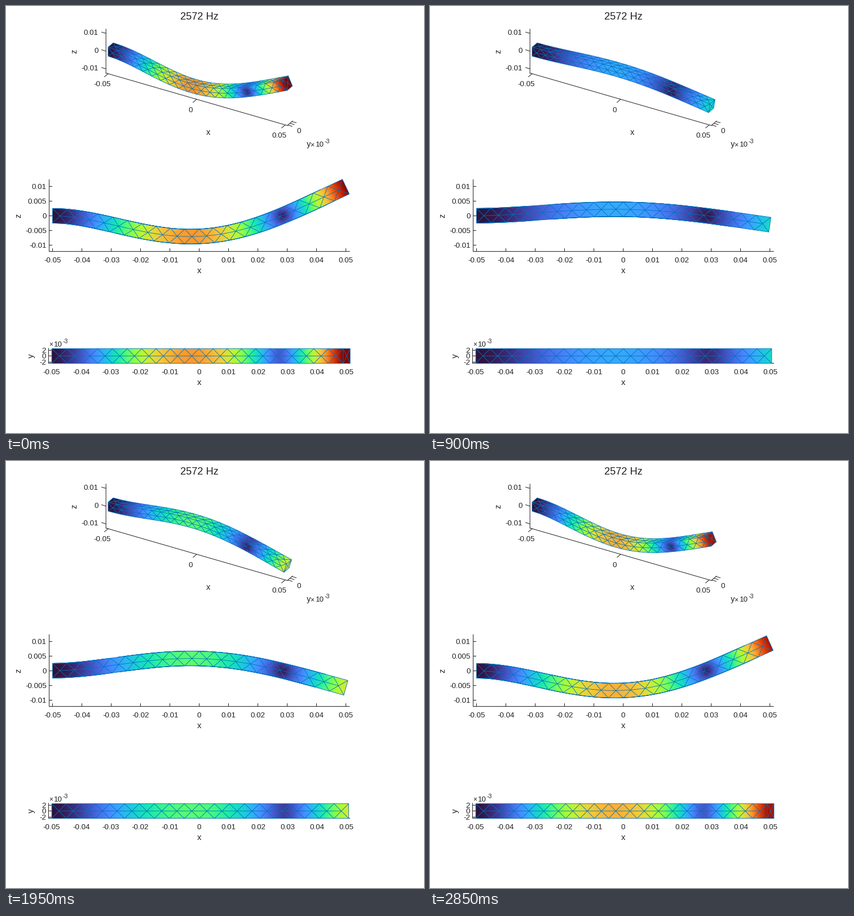
Recreate the animation shown at these times as a matplotlib script. Size 741 px wide and 756 px high, loop 3 s.

```python
import numpy as np
import matplotlib.pyplot as plt
from matplotlib.animation import FuncAnimation
from matplotlib.collections import LineCollection
from matplotlib.path import Path
from matplotlib.tri import Triangulation

W, H, DPI = 741, 756, 100
FRAMES, INTERVAL = 20, 150
PX = 72 / DPI                      # one pixel in points
INK, EDGE = "#212121", "#0072BD"
TICK, LABEL, TITLE, EXPONENT = 13.33, 14.67, 18.3, 10.6
plt.rcParams["font.family"] = "Liberation Sans"

LENGTH, HALF, CELLS = 0.1, 0.0025, 20
TIP = 0.0099                       # tip deflection at full swing
SPLIT = 4                          # colour subdivisions per triangle edge

fig = plt.figure(figsize=(W / DPI, H / DPI), dpi=DPI, facecolor="white")
ax = fig.add_axes([0, 0, 1, 1])
ax.set_xlim(0, W)
ax.set_ylim(H, 0)
ax.set_autoscale_on(False)
ax.axis("off")


# Beam mesh: four long faces plus the free end, wound outwards

def build_mesh():
    step = LENGTH / CELLS
    xs = -LENGTH / 2 + step * np.arange(CELLS + 1)
    ring = [(-1, -1), (-1, 1), (1, 1), (1, -1)]
    nodes, tris = [], []

    def add_row(xvals, y, z):
        start = len(nodes)
        nodes.extend((x, y * HALF, z * HALF) for x in xvals)
        return range(start, len(nodes))

    corners = [add_row(xs, y, z) for y, z in ring]
    end = add_row([xs[-1]], 0, 0)[0]
    for k in range(4):
        (ya, za), (yb, zb) = ring[k], ring[(k + 1) % 4]
        a, b = corners[k], corners[(k + 1) % 4]
        m = add_row(xs[:-1] + step / 2, (ya + yb) / 2, (za + zb) / 2)
        for j in range(CELLS):
            tris += [(a[j], a[j + 1], m[j]), (b[j + 1], b[j], m[j])]
            if j + 1 < CELLS:
                tris += [(a[j + 1], m[j + 1], m[j]), (b[j + 1], m[j], m[j + 1])]
        tris += [(a[0], m[0], b[0]), (a[-1], b[-1], m[-1]), (end, b[-1], a[-1])]
    return np.array(nodes), np.array(tris)


def bending_mode(s):
    """Second cantilever mode and its slope, scaled to 1 at the tip."""
    beta, sigma = 4.69409, 1.018467

    def shape(t):
        t = beta * t
        return np.cosh(t) - np.cos(t) - sigma * (np.sinh(t) - np.sin(t))

    t = beta * s
    slope = beta * (np.sinh(t) + np.sin(t) - sigma * (np.cosh(t) - np.cos(t)))
    return shape(s) / shape(1.0), slope / shape(1.0)


def displacement(pts):
    deflection, slope = bending_mode(pts[..., 0] / LENGTH + 0.5)
    u = np.zeros_like(pts)
    u[..., 0] = -pts[..., 2] * slope * TIP / LENGTH
    u[..., 2] = deflection * TIP
    return u


def subdivision(n):
    """Barycentric weights and small triangles of a split triangle."""
    index, weights, small = {}, [], []
    for i in range(n + 1):
        for j in range(n + 1 - i):
            index[i, j] = len(weights)
            weights.append((1 - (i + j) / n, i / n, j / n))
    for i in range(n):
        for j in range(n - i):
            small.append((index[i, j], index[i + 1, j], index[i, j + 1]))
            if i + j < n - 1:
                small.append((index[i + 1, j], index[i + 1, j + 1], index[i, j + 1]))
    return np.array(weights), np.array(small)


NODES, TRIS = build_mesh()
MODE = displacement(NODES)
WEIGHTS, SMALL = subdivision(SPLIT)
FINE_SIZE = np.linalg.norm(
    displacement(np.einsum("mk,tkd->tmd", WEIGHTS, NODES[TRIS])), axis=2)


# Views: pixel origin and projection matrix

S, C30 = 3626, np.sqrt(3) / 2
ISO = (np.array([342.5, 122.3]),
       S * np.array([[C30, 0.5, 0], [0.25, -C30 / 2, -C30]]))
SIDE = (np.array([342.5, 371.3]), 5200 * np.array([[1, 0, 0], [0, 0, -1]]))
TOP = (np.array([342.5, 619.75]), 5228 * np.array([[1, 0, 0], [0, -1, 0]]))


def project(view, pts):
    origin, matrix = view
    return origin + np.asarray(pts) @ matrix.T


# Static axes

def text(x, y, s, size=TICK, ha="center", rotation=0):
    ax.text(x, y, s, fontsize=size * PX, color=INK, ha=ha, va="baseline",
            rotation=rotation, rotation_mode="anchor")


def line(p, q):
    ax.plot([p[0], q[0]], [p[1], q[1]], color=INK, lw=PX, snap=False, zorder=0.5)


def exponent(x, y):
    text(x, y, "×", 12, ha="left")
    text(x + 9, y, "10", ha="left")
    text(x + 25, y - 6, "-3", EXPONENT, ha="left")


def number(v):
    return f"{v:.3f}".rstrip("0").rstrip(".") if v else "0"


def pixel_centre(v):
    return np.floor(v) + 0.5


def flat_axes(view, left, right, top, bottom, ticks, row, label_row):
    line((left, top), (left, bottom))
    line((left, bottom), (right, bottom))
    for v in np.arange(-5, 6) / 100:
        x = project(view, (v, 0, 0))[0]
        mark = pixel_centre(x)
        line((mark, bottom), (mark, bottom - 5))
        text(x, row, number(v))
    for y, s in ticks:
        mark = pixel_centre(y)
        line((left, mark), (left + 5, mark))
        text(left - 4.5, mark + 4.8, s, ha="right")
    text(342.5, label_row, "x", LABEL)


def iso_axes():
    x0, y0, z0 = 0.0512, 0.0025, 0.0124
    near = project(ISO, (-x0, -y0, -z0))
    far = project(ISO, (x0, -y0, -z0))
    line(near, project(ISO, (-x0, -y0, z0)))
    line(near, far)
    line(far, project(ISO, (x0, y0, -z0)))
    for v in (-0.01, 0, 0.01):
        p = project(ISO, (-x0, -y0, v))
        line(p, p + (-7.6, -2.2))
        text(164, p[1] + 2.7, number(v), ha="right")
    for v in (-0.05, 0, 0.05):
        p = project(ISO, (v, -y0, -z0))
        line(p, p + (-6.3, 5.4))
        text(p[0] - 10.3, p[1] + 22.4, number(v))
    for v in (-0.002, 0, 0.002):
        p = project(ISO, (x0, v, -z0))
        line(p, p + (7.6, 2.2))
    text(519, 224.8, "0")
    text(359, 228, "x", LABEL)
    text(125.5, 80.5, "z", LABEL, rotation=90)
    text(536.5, 248.8, "y", LABEL)
    exponent(539.5, 249)


text(342.7, 24.5, "2572 Hz", TITLE)
iso_axes()
side_ticks = [(project(SIDE, (0, 0, v))[1], number(v))
              for v in (-0.01, -0.005, 0, 0.005, 0.01)]
flat_axes(SIDE, 76.5, 609, 307.5, 434.5, side_ticks, 454.3, 472.8)
text(26.5, 371.5, "z", LABEL, rotation=90)
top_ticks = [(project(TOP, (0, v / 1000, 0))[1], str(v)) for v in (-2, 0, 2)]
flat_axes(TOP, 75.5, 609.5, 606, 632.5, top_ticks, 652.5, 671)
text(49, 619.5, "y", LABEL, rotation=90)
exponent(76, 602.8)


# Animated beams

moving = []


def outline(corners):
    """Union of the visible triangles, used to trim the colour fill."""
    closed = np.concatenate([corners, corners[:, :1]], axis=1).reshape(-1, 2)
    codes = [Path.MOVETO, Path.LINETO, Path.LINETO, Path.CLOSEPOLY]
    return Path(closed, codes * len(corners))


def draw_beam(view, pts, swing):
    p = project(view, pts)
    u, v = p[TRIS[:, 1]] - p[TRIS[:, 0]], p[TRIS[:, 2]] - p[TRIS[:, 0]]
    visible = u[:, 0] * v[:, 1] - u[:, 1] * v[:, 0] < -0.5
    seen = TRIS[visible]

    fine = np.einsum("mk,tkd->tmd", WEIGHTS, p[seen]).reshape(-1, 2)
    shade = abs(swing) * FINE_SIZE[visible].ravel()
    offsets = len(WEIGHTS) * np.arange(len(seen))
    small = (SMALL[None] + offsets[:, None, None]).reshape(-1, 3)
    mesh = Triangulation(fine[:, 0], fine[:, 1], small)
    fill = ax.tripcolor(mesh, shade, shading="gouraud", cmap="turbo",
                        vmin=0, vmax=FINE_SIZE.max(), zorder=1)
    fill.set_clip_path(outline(p[seen]), ax.transData)

    pairs = np.vstack([seen[:, [0, 1]], seen[:, [1, 2]], seen[:, [2, 0]]])
    edges = np.unique(np.sort(pairs, axis=1), axis=0)
    wires = LineCollection(p[edges], colors=EDGE, linewidths=0.85 * PX, zorder=2)
    wires.set_snap(False)
    ax.add_collection(wires)
    moving.extend([fill, wires])


def update(i):
    while moving:
        moving.pop().remove()
    swing = np.cos(2 * np.pi * i / FRAMES)
    pts = NODES + swing * MODE
    for view in (ISO, SIDE, TOP):
        draw_beam(view, pts, swing)
    return moving


anim = FuncAnimation(fig, update, frames=FRAMES, interval=INTERVAL,
                     repeat=True, repeat_delay=0, blit=False)
plt.show()
```
